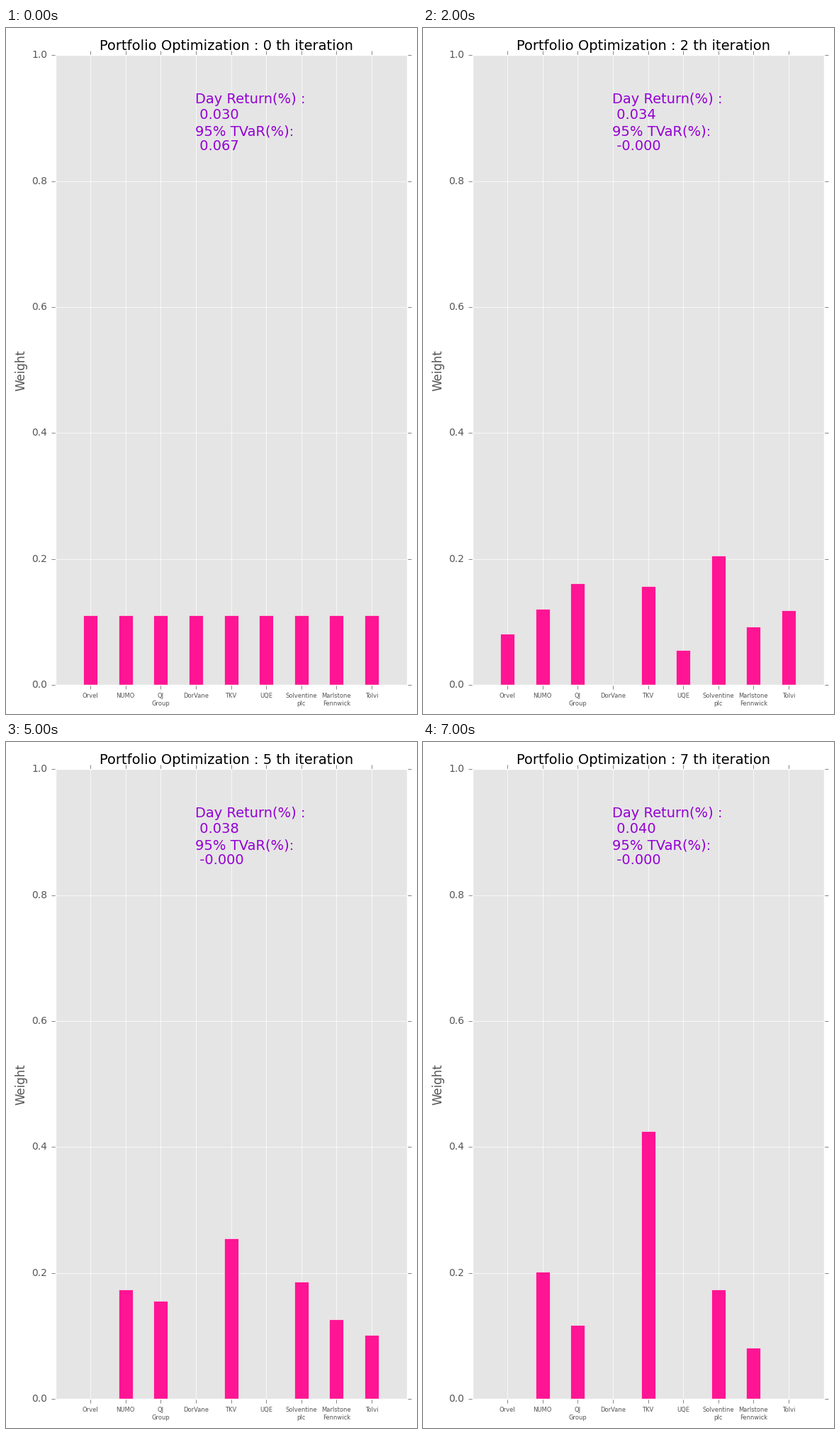
These frames come from a looping animation (580 px wide and 966 px high, 8 s). A matplotlib script:

```python
import matplotlib.pyplot as plt
import numpy as np
from matplotlib.animation import FuncAnimation

W, H, DPI = 580, 966, 100
LEFT, RIGHT, TOP, BOTTOM = 69.6, 565.6, 38.2, 925.3
PINK, VIOLET, GREY = "#FF1493", "#9400D3", "#555555"

NAMES = ["Orvel", "NUMO", "QJ\nGroup", "DorVane", "TKV", "UQE",
         "Solventine\nplc", "Marlstone\nFennwick", "Tolvi"]


def blend(a, b, t):
    return (1 - t) * np.array(a) + t * np.array(b)


# Portfolio weights after each iteration
start = np.full(9, 1 / 9)
first = [0.0973, 0.1094, 0.1624, 0.0113, 0.1375, 0.0676, 0.2119, 0.0823, 0.1172]
third = [0.0660, 0.1332, 0.1607, 0, 0.1771, 0.0429, 0.1997, 0.1027, 0.1172]
fourth = [0, 0.1716, 0.1585, 0, 0.2447, 0, 0.1868, 0.1292, 0.1094]
sixth = [0, 0.1827, 0.1444, 0, 0.3078, 0, 0.1827, 0.1128, 0.0676]
seventh = [0, 0.2018, 0.1172, 0, 0.4250, 0, 0.1737, 0.0813, 0]
second = blend(first, third, 0.5)
second[3], second[8] = 0, 0.1184
fifth = blend(fourth, sixth, 0.17)
WEIGHTS = [start, first, second, third, fourth, fifth, sixth, seventh]
RETURNS = [0.030, 0.033, 0.034, 0.035, 0.038, 0.038, 0.038, 0.040]
TVAR = ["0.067", "0.000"] + ["-0.000"] * 6

plt.rcParams.update({
    "font.family": "DejaVu Sans",
    "font.size": 10,
    "ytick.alignment": "center",
})

fig = plt.figure(figsize=(W / DPI, H / DPI), dpi=DPI, facecolor="white")
ax = fig.add_axes([LEFT / W, 1 - BOTTOM / H, (RIGHT - LEFT) / W, (BOTTOM - TOP) / H],
                  facecolor="#E5E5E5")
ax.set(xlim=(-1, 9), ylim=(0, 1))
ax.tick_params(direction="out", length=4, width=0.5, pad=4, color=GREY,
               labelcolor=GREY, top=True, right=True)
ax.set_xticks(range(9), NAMES, fontsize=6)
ax.set_yticks(np.arange(6) / 5)
ax.grid(color="white", lw=0.5, ls="-")
for spine in ax.spines.values():
    spine.set(color="white", linewidth=1)

bars = ax.bar(range(9), start, width=0.4, color=PINK, edgecolor="#EEEEEE",
              lw=0.5, zorder=2)


def label(x, y, text="", size=14, color=VIOLET, **kw):
    """Place text at pixel x, y measured from the top left."""
    return fig.text(x / W, 1 - y / H, text, size=size, color=color, **kw)


label(21, 481.6, "Weight", 12, GREY, rotation=90, ha="center", va="center")
label(267, 106, "Day Return(%) :")
label(267, 151, "95% TVaR(%):")
title = label(132.5, 31.3, color="black")
return_text = label(267, 128)
tvar_text = label(267, 172)


def update(step):
    for bar, weight in zip(bars, WEIGHTS[step]):
        bar.set_height(weight)
        bar.set_visible(weight > 0)
    title.set_text(f"Portfolio Optimization : {step} th iteration")
    return_text.set_text(f" {RETURNS[step]:.3f}")
    tvar_text.set_text(f" {TVAR[step]}")
    return [*bars, title, return_text, tvar_text]


anim = FuncAnimation(fig, update, frames=len(WEIGHTS), interval=1000,
                     repeat=True, repeat_delay=0, blit=False)
plt.show()
```
